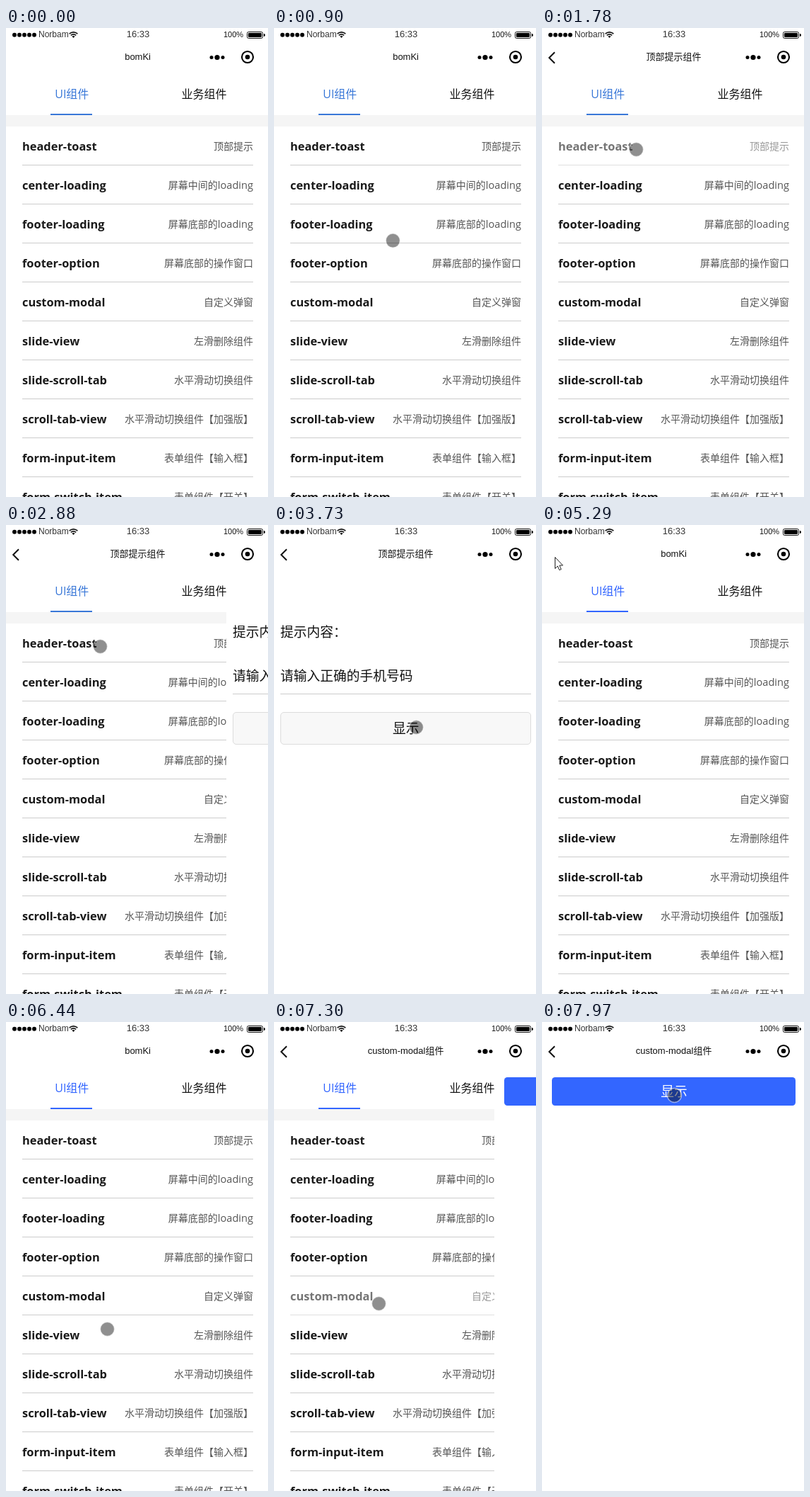
An HTML page for the animation above (8 s loop, 371 px wide and 662 px high).

```html
<!DOCTYPE html>
<html lang="zh-CN">
<head>
<meta charset="utf-8">
<title>UI组件</title>
<style>
html, body { margin: 0; width: 100%; height: 100%; overflow: hidden; background: #fff; }
svg { display: block; width: 371px; height: 662px; }
text { font-family: "Open Sans", "Noto Sans CJK SC", sans-serif; fill: #111; }
.bar text { font-family: "Liberation Sans", "Noto Sans CJK SC", sans-serif; }
.bar .soft { fill: #333; }
.name { font-size: 16.4px; font-weight: 700; fill: #1a1a1a; }
.note { font-size: 14px; fill: #555; text-anchor: end; text-spacing-trim: space-all; }
.note .latin { font-size: 14.6px; }
.tab { font-size: 16px; text-anchor: middle; }
.title { font-size: 13px; text-anchor: middle; }
.big { font-size: 18.75px; }
.mid { text-anchor: middle; }
.colon { font-family: "Noto Sans CJK JP", sans-serif; }
</style>
</head>
<body>
<svg viewBox="0 0 371 662" xmlns="http://www.w3.org/2000/svg">
  <g id="list">
    <g id="accent" fill="#3a78d8">
      <text class="tab" x="93.3" y="99" style="fill:inherit">UI组件</text>
      <rect x="63" y="121" width="59" height="2"/>
    </g>
    <text class="tab" x="280.5" y="99">业务组件</text>
    <rect y="123" width="371" height="16" fill="#f5f5f5"/>
    <g id="rows"></g>
  </g>

  <g id="toastPage">
    <rect y="64" width="371" height="598" fill="#fff"/>
    <text class="big" x="9" y="158">提示内容<tspan class="colon">：</tspan></text>
    <text class="big" x="9" y="220">请输入正确的手机号码</text>
    <rect x="9" y="238" width="355" height="1" fill="#ccc"/>
    <rect x="9.5" y="264.5" width="354" height="45" rx="4.5" fill="#f8f8f8" stroke="#dcdcdc"/>
    <text class="big mid" x="186.7" y="294">显示</text>
  </g>

  <g id="modalPage">
    <rect y="64" width="371" height="598" fill="#fff"/>
    <rect x="14" y="78" width="345" height="40" rx="4.5" fill="#36f"/>
    <text class="big mid" x="187" y="105" style="fill:#fff">显示</text>
  </g>

  <g class="bar">
    <g id="signal"></g>
    <text class="soft" x="46" y="13" font-size="12">Norbam</text>
    <g fill="none" stroke="#111" stroke-width="1.7">
      <path d="M89.6 8.2Q95.5 3.4 101.4 8.2M91.8 10.4Q95.5 7.4 99.2 10.4"/>
    </g>
    <path d="M93.4 11.8Q95.5 10.2 97.6 11.8L95.5 14Z"/>
    <text class="soft mid" x="187" y="13" font-size="13">16:33</text>
    <text x="308" y="13" font-size="11">100%</text>
    <rect x="341.5" y="5.5" width="22" height="9" rx="2" fill="none" stroke="#111"/>
    <rect x="343" y="7" width="19" height="6" rx="1"/>
    <path d="M365 8a2 2 0 0 1 0 4Z"/>
    <path id="back" d="M18 34.2L10.2 42L18 49.8" fill="none" stroke="#111" stroke-width="2"/>
    <text id="title" class="title" x="186.6" y="45"></text>
    <circle cx="291" cy="41.5" r="2.5"/>
    <circle cx="299" cy="41.5" r="3.6"/>
    <circle cx="307" cy="41.5" r="2.5"/>
    <circle cx="342" cy="41" r="8" fill="none" stroke="#000" stroke-width="2.1"/>
    <circle cx="342" cy="41" r="3.3"/>
  </g>

  <circle id="touch" r="10" fill="#000" fill-opacity=".44" stroke="#fff" stroke-opacity=".5" stroke-width="1.4"/>
  <path id="arrow" d="M.5 .5V16.5L4.2 13L6.6 18.6L9.2 17.5L6.8 12H11.5Z" fill="#fff" stroke="#222"/>
</svg>

<script>
const $ = id => document.getElementById(id);
const LOOP = 8000;

const items = [
  ["header-toast", "顶部提示"],
  ["center-loading", "屏幕中间的loading"],
  ["footer-loading", "屏幕底部的loading"],
  ["footer-option", "屏幕底部的操作窗口"],
  ["custom-modal", "自定义弹窗"],
  ["slide-view", "左滑删除组件"],
  ["slide-scroll-tab", "水平滑动切换组件"],
  ["scroll-tab-view", "水平滑动切换组件【加强版】"],
  ["form-input-item", "表单组件【输入框】"],
  ["form-switch-item", "表单组件【开关】"]
];
$("rows").innerHTML = items.map(([name, note], i) => `
  <g transform="translate(0 ${139 + 55 * i})">
    <text class="name" x="23" y="34">${name}</text>
    <text class="note" x="350" y="33">${note.replace("loading", '<tspan class="latin">loading</tspan>')}</text>
    <rect x="23" y="54" width="327" height="1" fill="#ccc"/>
  </g>`).join("");
$("signal").innerHTML = [0, 1, 2, 3, 4]
  .map(i => `<circle cx="${12 + 7 * i}" cy="9.7" r="3"/>`).join("");

const rows = $("rows").children;

// pointer moves: first step, last step, step count, way points
const moves = [
  [450, 1150, 10, [[276, 658], [225, 470], [165, 290], [131.5, 199.5]]],
  [1320, 1460, 3, [[131.5, 199.5], [152, 186], [133.5, 171.5]]],
  [3190, 3500, 5, [[133.5, 171.5], [137, 169], [202, 283]]],
  [3650, 3730, 2, [[202, 283], [201.5, 285.5]]],
  [3970, 4740, 11, [[201.5, 285.5], [276, 180], [215, 62], [90, 11], [21, 31]]],
  [4840, 5040, 4, [[21, 31], [14, 42], [18, 45]]],
  [5390, 6060, 10, [[18, 45], [70, 180], [159, 374]]],
  [6140, 6440, 5, [[159, 374], [150, 412], [143.5, 433.5]]],
  [6520, 6900, 6, [[143.5, 433.5], [148.5, 397.5]]],
  [7530, 7970, 7, [[148.5, 397.5], [172, 240], [187.5, 103.5]]]
];

// page offsets: [time, x]
const toastSlide = [[2810, 312], [2890, 110], [2960, 0], [5290, null]];
const modalSlide = [[7300, 312], [7370, 110], [7450, 0]];
const titles = [[0, "bomKi"], [1780, "顶部提示组件"], [5290, "bomKi"], [7150, "custom-modal组件"]];

const held = (steps, t, none = null) =>
  steps.reduce((v, [at, value]) => t >= at ? value : v, none);
const between = (t, a, b) => t >= a && t < b;
const show = (el, on) => el.style.display = on ? "" : "none";
const place = (el, x, y) => el.setAttribute("transform", `translate(${x} ${y})`);

function along(pts, u) {
  const s = u * (pts.length - 1);
  const i = Math.min(Math.floor(s), pts.length - 2);
  return [0, 1].map(k => pts[i][k] + (pts[i + 1][k] - pts[i][k]) * (s - i));
}

function pointer(t) {
  const move = moves.filter(m => t >= m[0]).pop();
  if (!move) return null;
  const [from, to, n, pts] = move;
  const gap = (to - from) / (n - 1);
  const u = Math.min(n, Math.floor((t - from) / gap + 1e-6) + 1) / n;
  return along(pts, u * u * (3 - 2 * u));
}

function slide(page, steps, t) {
  const x = held(steps, t);
  show(page, x !== null);
  if (x !== null) place(page, x, 0);
}

function draw(t) {
  const title = held(titles, t);
  if ($("title").textContent !== title) $("title").textContent = title;
  show($("back"), title !== titles[0][1]);
  $("accent").setAttribute("fill", t < 5290 ? "#3a78d8" : "#36f");
  rows[0].style.opacity = between(t, 1710, 2410) ? .6 : 1;
  rows[4].style.opacity = t >= 7070 ? .6 : 1;
  slide($("toastPage"), toastSlide, t);
  slide($("modalPage"), modalSlide, t);

  // the touch dot turns into an arrow over the title bar
  const p = pointer(t);
  const inBar = p && p[1] < 64;
  show($("touch"), p && !inBar);
  show($("arrow"), inBar);
  if (p) place(inBar ? $("arrow") : $("touch"), ...p);
}

const start = performance.now();
function tick() {
  draw((performance.now() - start) % LOOP);
  requestAnimationFrame(tick);
}
tick();
</script>
</body>
</html>
```
